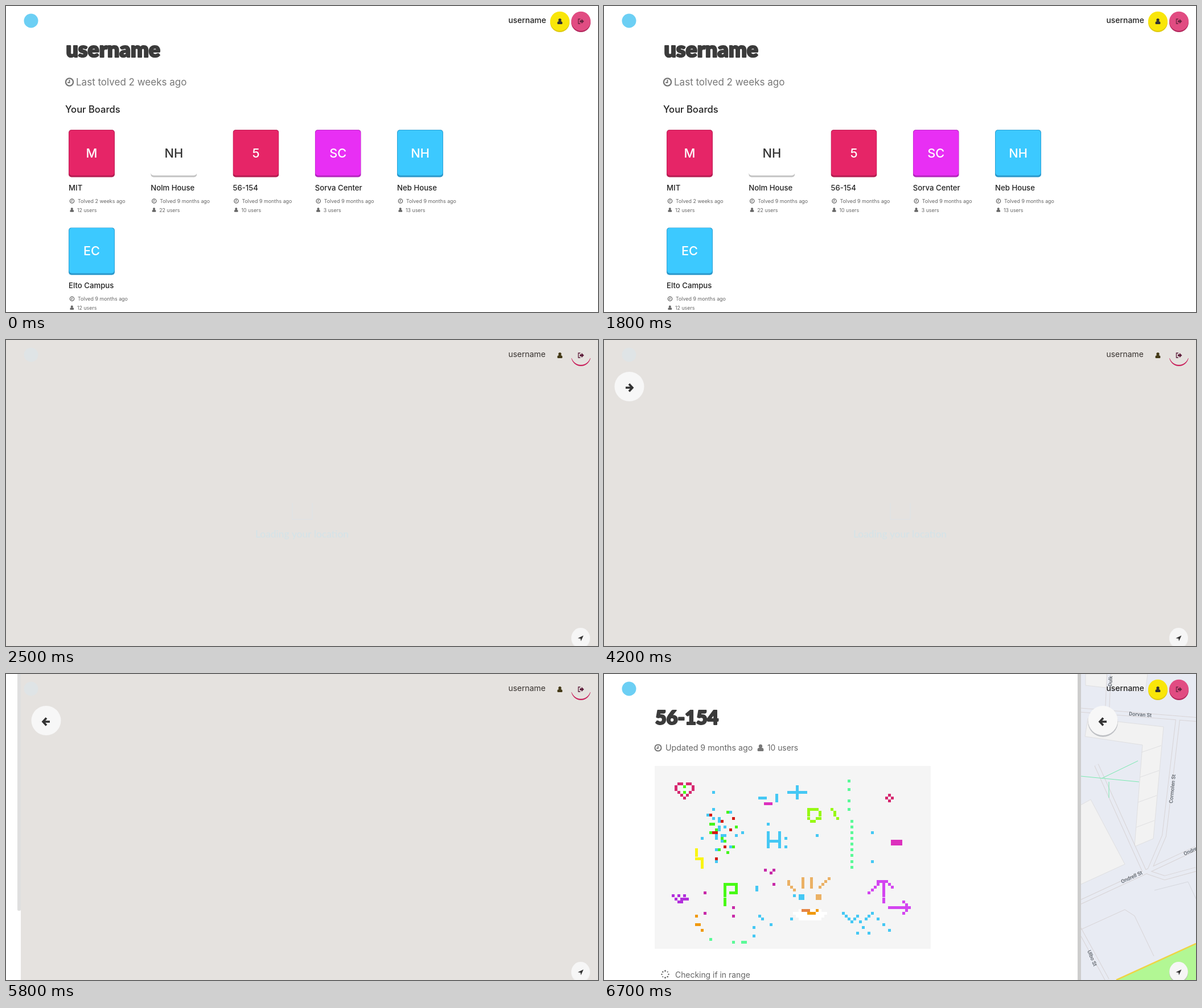
Recreate the animation shown at these times as an HTML page with a canvas. Size 1040 by 539 pixels, loop 6800 ms.

```html
<!DOCTYPE html>
<html lang="en">
<head>
<meta charset="utf-8">
<title>Pixel boards</title>
<style>
html, body { margin: 0; width: 100%; height: 100%; overflow: hidden; background: #fff; }
canvas { display: block; width: 1040px; height: 539px; }
</style>
</head>
<body>
<canvas id="stage" width="1040" height="539"></canvas>
<script>
const ctx = document.getElementById('stage').getContext('2d');
const LOOP = 6800, STEP = 100, TAU = Math.PI * 2;
const T = { loading: 1900, map: 2500, button: 3400, strip: 5100, slide: 5800, tiles: 6100, open: 6400 };
const SKY = '#3cc9ff', LOGO = '#6ccff4', INK = '#333', SOFT = '#666', GREY = '#e5e2df';
const BODY = 'Inter, sans-serif', DISPLAY = 'Lato, sans-serif';

const lerp = (a, b, p) => a + (b - a) * p;
const clamp = v => Math.min(1, Math.max(0, v));
const ease = u => u * u * (3 - 2 * u);
function seeded(seed) {
  return () => (seed = seed * 16807 % 2147483647) / 2147483647;
}

function rect(x, y, w, h, color) {
  ctx.fillStyle = color;
  ctx.fillRect(x, y, w, h);
}
function round(x, y, w, h, r, color) {
  ctx.fillStyle = color;
  ctx.beginPath();
  ctx.roundRect(x, y, w, h, r);
  ctx.fill();
}
function oval(x, y, rx, ry, color) {
  ctx.fillStyle = color;
  ctx.beginPath();
  ctx.ellipse(x, y, rx, ry, 0, 0, TAU);
  ctx.fill();
}
const disc = (x, y, r, color) => oval(x, y, r, r, color);
function poly(points, fill) {
  ctx.beginPath();
  points.forEach(([x, y]) => ctx.lineTo(x, y));
  ctx.closePath();
  ctx.fillStyle = fill;
  ctx.fill();
}
function line(points, color, width = 1) {
  ctx.beginPath();
  points.forEach(([x, y]) => ctx.lineTo(x, y));
  ctx.strokeStyle = color;
  ctx.lineWidth = width;
  ctx.stroke();
}
function clipped(x, y, w, h, draw) {
  ctx.save();
  ctx.beginPath();
  ctx.rect(x, y, w, h);
  ctx.clip();
  draw();
  ctx.restore();
}
function text(str, x, y, size, color = INK, weight = 400, align = 'left', family = BODY) {
  ctx.font = `${weight} ${size}px ${family}`;
  ctx.textAlign = align;
  ctx.fillStyle = color;
  ctx.fillText(str, x, y);
}
function heading(str, x, y, size, color, swell, align) {
  text(str, x, y, size, color, 900, align, DISPLAY);
  ctx.lineJoin = 'round';
  ctx.strokeStyle = color;
  ctx.lineWidth = swell;
  ctx.strokeText(str, x, y);
  ctx.lineJoin = 'miter';
}

// Icons
function clock(x, y, r, color) {
  ctx.strokeStyle = color;
  ctx.lineWidth = r * 0.3;
  ctx.beginPath();
  ctx.arc(x, y, r * 0.85, 0, TAU);
  ctx.stroke();
  line([[x, y - r * 0.5], [x, y + r * 0.12], [x - r * 0.42, y + r * 0.12]], color, r * 0.26);
}
function person(x, y, s, color) {
  disc(x, y - s * 0.45, s * 0.5, color);
  round(x - s * 0.85, y, s * 1.7, s * 0.95, [s * 0.5, s * 0.5, s * 0.25, s * 0.25], color);
}
function signOut(x, y, color) {
  line([[x - 1, y - 4], [x - 4.5, y - 4], [x - 4.5, y + 4], [x - 1, y + 4]], color, 1.3);
  rect(x - 2, y - 1.7, 3.2, 3.4, color);
  poly([[x + 1, y - 4.3], [x + 5.5, y], [x + 1, y + 4.3]], color);
}
function arrow(x, y, dir) {
  line([[x - 6.5 * dir, y], [x + 5 * dir, y]], INK, 3.6);
  line([[x - 0.5 * dir, y - 6.5], [x + 5.5 * dir, y], [x - 0.5 * dir, y + 6.5]], INK, 3.6);
}

// Header and floating buttons
function raisedDisc(x, color, shade) {
  disc(x, 29, 17, shade);
  disc(x, 26.7, 17, color);
}
function header() {
  text('username', 882.5, 29.5, 13.9, '#222', 500);
  raisedDisc(973, '#f9e609', '#dfca12');
  person(973, 27, 5.2, INK);
  raisedDisc(1010, '#e14c82', '#b3285d');
  signOut(1010, 27, '#6b2440');
}
function fadedHeader() {
  text('username', 882.5, 29.5, 13.9, '#37322f');
  person(973, 27, 5.2, '#443a18');
  clipped(990, 32, 40, 16, () => raisedDisc(1010, GREY, '#c9205b'));
  signOut(1010, 27, '#5e1f3c');
}
function logo(color) {
  disc(44, 26, 12.5, color);
}
function locate(shadow) {
  oval(1009.5, 526, 16.5, 18, shadow);
  oval(1009.5, 524.5, 16.3, 17.5, '#f6f6f6');
  poly([[1014.5, 520.5], [1010, 530.5], [1009.3, 526], [1004.5, 525.3]], INK);
}
function toggle(x, dir, raised) {
  if (raised) disc(x, 84.5, 26.3, '#bfc1c5');
  disc(x, 82, 26, '#f7f7f7');
  arrow(x, 84, dir);
}

// Board list
const TINTS = {
  rose: { face: '#e62567', shade: '#b51c51' },
  white: { face: '#fff', shade: '#c3c3c3' },
  violet: { face: '#e82ff4', shade: '#b426bd' },
  sky: { face: SKY, shade: '#2b98cb' }
};
const BOARDS = [
  { mark: 'M', name: 'MIT', tint: 'rose', users: 12, age: '2 weeks' },
  { mark: 'NH', name: 'Nolm House', tint: 'white', users: 22 },
  { mark: '5', name: '56-154', tint: 'rose', users: 10 },
  { mark: 'SC', name: 'Sorva Center', tint: 'violet', users: 3 },
  { mark: 'NH', name: 'Neb House', tint: 'sky', users: 13 },
  { mark: 'EC', name: 'Elto Campus', tint: 'sky', users: 12 }
];
function card({ mark, name, tint, users, age = '9 months' }, i) {
  const x = 110 + i % 5 * 144.25, y = 218 + Math.floor(i / 5) * 172.3;
  const { face, shade } = TINTS[tint], white = tint === 'white';
  clipped(x, white ? y + 76 : y, 81, 90, () => round(x, y, 81, 83.5, 5, shade));
  const inset = white ? 0 : 0.8;
  round(x + inset, y + inset, 81 - 2 * inset, 80.5 - inset, 5, face);
  text(mark, x + 40.5, y + 48.8, 21.8, white ? INK : '#fff', 500, 'center');
  text(name, x, y + 107, 13.2, '#222', 500);
  clock(x + 6, y + 125.5, 4.3, SOFT);
  text(`Tolved ${age} ago`, x + 16, y + 128.6, 8.9, SOFT);
  person(x + 5.8, y + 141, 4, SOFT);
  text(`${users} users`, x + 15, y + 144.5, 8.8, SOFT);
}
function home() {
  logo(LOGO);
  heading('username', 105.5, 90, 37.5, '#3b3b3b', 2.2);
  clock(111.5, 134, 7.8, '#777');
  text('Last tolved 2 weeks ago', 123, 140.3, 17, '#777');
  text('Your Boards', 104, 187.5, 16.6, '#222', 500);
  BOARDS.forEach(card);
}

// Square that flips about its two axes in turn
function flippingPlane(t) {
  const phase = (t - 1860) / 600, half = 14.6;
  const a = ease(phase % 1) * Math.PI, vertical = Math.floor(phase) % 2 === 0;
  poly([[-1, -1], [1, -1], [1, 1], [-1, 1]].map(([i, j]) => {
    const scale = half * 120 / (120 - half * (vertical ? j : i) * Math.sin(a));
    const x = vertical ? i : i * Math.cos(a), y = vertical ? j * Math.cos(a) : j;
    return [520 + x * scale, 299 + y * scale];
  }), SKY);
}
function loading(t) {
  rect(0, 0, 1, 539, '#ececec');
  logo(LOGO);
  flippingPlane(t);
  heading('Loading your location', 520, 347.5, 17.4, '#45c5f1', 0.8, 'center');
  locate('#aaa');
}
function loadingTrace() {
  line([[503, 287], [503, 316], [538, 316], [538, 287]], '#dce3e8');
  text('Loading your location', 520, 348, 17.4, '#d3e3e8', 400, 'center', DISPLAY);
}

// Street map
function street(str, x, y, angle) {
  ctx.save();
  ctx.translate(x, y);
  ctx.rotate(angle);
  text(str, 0, 0, 9.2, '#5d646c', 500, 'left', 'Roboto, sans-serif');
  ctx.restore();
}
function building(...points) {
  poly(points, '#f2f2f2');
  line([...points, points[0]], '#dfdfe1');
}
function streetMap() {
  const ground = '#e8ebf3', path = '#79eab0';
  rect(832, 0, 208, 539, ground);
  building([846, 0], [955, 0], [951, 32], [846, 20]);
  building([850, 78], [983, 93], [965, 290], [932, 304], [946, 125], [845, 110]);
  building([830, 235], [855, 221], [915, 335], [830, 374]);
  for (let i = 0; i < 4; i++) line([[944 - i * 3, 138 + i * 44], [979 - i * 4, 126 + i * 44]], '#dfdfe1');

  const roads = [
    [[887, 0], [884, 66]],
    [[830, 63], [1040, 80]],
    [[1008, 80], [984, 285], [958, 346]],
    [[865, 160], [950, 349]],
    [[830, 405], [955, 347], [1040, 307]],
    [[830, 440], [884, 539]],
    [[955, 349], [985, 359], [1040, 344]]
  ];
  roads.forEach(points => line(points, '#d8d4d6', 8));
  roads.forEach(points => line(points, ground, 6));
  line([[838, 450], [915, 415], [932, 426], [966, 497]], '#d8d4d6');
  line([[967, 381], [1026, 366], [1040, 396]], '#d5d7dd');

  line([[838, 180], [940, 190]], path);
  line([[874, 184], [938, 153]], path);
  line([[887, 190], [887, 218]], path);
  poly([[900, 539], [1040, 475], [1040, 539]], '#b2f794');
  line([[900, 539], [1040, 475]], '#efd445', 2.5);
  street('Dulk', 892, 22, -1.5);
  street('Dorvan St', 922, 73, 0.07);
  street('Cormolen St', 999, 228, -1.47);
  street('Ondrell St', 910, 369, -0.43);
  street('Ondrell St', 1020, 320, -0.43);
  street('Ulbo St', 849, 488, 1.18);
}

// Pixel board
function cell(color, c, r) {
  const x = Math.round(88.6 + c * 5.066), y = Math.round(160.3 + r * 5.07);
  rect(x, y, 5, 5, color);
}
function block(color, c, r, w, h) {
  rect(Math.round(88.6 + c * 5.066), Math.round(160.3 + r * 5.07), Math.round(w * 5.066), Math.round(h * 5.07), color);
}
// Pen line through key cells
function pen(color, ...keys) {
  keys.slice(1).forEach(([c, r], i) => {
    const [c0, r0] = keys[i], n = Math.max(Math.abs(c - c0), Math.abs(r - r0));
    for (let k = 0; k <= n; k++) cell(color, Math.round(lerp(c0, c, k / n)), Math.round(lerp(r0, r, k / n)));
  });
}
function scatter(color, n, c, r, w, h, seed) {
  const rand = seeded(seed);
  for (let i = 0; i < n; i++) cell(color, c + Math.floor(rand() * w), r + Math.floor(rand() * h));
}
function heart(c, r) {
  for (let d = 0; d <= 3; d++) {
    for (const side of [-d, d]) {
      cell('#d6286f', c + side, r + 5 - d);
      cell('#d6286f', c + side, r + (d % 3 ? 0 : 1));
    }
    if (d % 2) cell('#48fa16', c, r + d);
  }
}
function burst(c, r) {
  const rand = seeded(11), colors = ['#45c8f4', '#d31b14', '#45c8f4', '#45f51d'];
  const spread = n => (rand() + rand() + rand() - 1.5) * n;
  for (let i = 0; i < 50; i++) {
    const down = spread(9);
    cell(colors[i % 4], Math.round(c + down * 0.25 + spread(6)), Math.round(r + down));
  }
}
function face() {
  const tan = '#ebb165', orange = '#f0990e';
  for (const c of [51, 54]) pen(tan, [c, 39], [c, 42]);
  pen(tan, [46, 40], [46, 41], [48, 43]);
  pen(tan, [57, 42], [60, 39]);
  block(tan, 56, 45, 2, 2);
  block('#45c8f4', 50, 45, 2, 2);
  for (let r = 50; r <= 53; r++) pen('#fff', [48 + r % 3, r], [59 - r % 3, r]);
  pen('#e58545', [51, 50], [53, 50]);
  pen(orange, [53, 51], [55, 51], [56, 50]);
}
function board() {
  const blue = '#45c8f4', mint = '#5bfa98', lime = '#97f914', green = '#48fa16';
  const violet = '#d345f0', pink = '#dc30bd', plum = '#c82aa8', orange = '#f0990e';
  rect(89, 162, 485, 322, '#f5f5f5');
  heart(10, 6);
  burst(22.5, 22);
  face();

  pen(blue, [36, 11], [38, 11]);
  pen(blue, [42, 10], [42, 12]);
  pen(pink, [38, 13], [40, 13]);
  pen(blue, [46, 9], [52, 9]);
  pen(blue, [49, 7], [49, 11]);
  for (let r = 5; r < 16; r += 3.4) cell(mint, 67, Math.round(r));
  for (let r = 19; r < 36; r += 2) cell(mint, 68, r);
  for (let i = 0; i < 4; i++) cell('#d6286f', 81 + Math.round(Math.cos(i * TAU / 4)), 11 + Math.round(Math.sin(i * TAU / 4)));

  pen(lime, [54, 19], [53, 18], [53, 15], [56, 15], [57, 16], [57, 18], [54, 19]);
  pen(lime, [61, 15], [63, 18]);
  for (const c of [39, 43]) pen(blue, [c, 23], [c, 28]);
  pen(blue, [39, 26], [43, 26]);
  for (const r of [20, 25, 28]) cell(blue, r === 20 ? 39 : 45, r);
  block(pink, 82, 26, 4, 2);
  pen('#faf513', [14, 29], [14, 32], [16, 32], [16, 35]);
  for (let i = 0; i < 6; i++) cell('#b22fdc', 6 + i, 45 + i % 2);
  pen('#b22fdc', [7, 46], [8, 47], [10, 46]);
  pen(green, [24, 48], [24, 41], [28, 41], [28, 44], [26, 44]);

  pen(violet, [79, 47], [79, 40]);
  pen(violet, [74, 44], [77, 41], [77, 40], [80, 40], [82, 42]);
  pen(violet, [81, 49], [88, 49], [86, 47]);
  pen(violet, [88, 49], [86, 51]);
  pen(blue, [65, 51], [68, 54], [70, 52]);
  pen(blue, [73, 53], [75, 51]);

  scatter(blue, 7, 70, 53, 12, 8, 5);
  scatter(blue, 9, 34, 40, 15, 21, 21);
  scatter(blue, 3, 56, 22, 24, 12, 9);
  scatter(plum, 4, 38, 36, 7, 7, 31);
  scatter(plum, 4, 17, 41, 13, 15, 17);
  scatter(orange, 4, 14, 52, 5, 8, 3);
  scatter(mint, 4, 19, 57, 14, 5, 13);
}

function busyRing(t) {
  for (let i = 0; i < 8; i++) {
    const a = (i + t / STEP) * TAU / 8;
    disc(107.5 + 6 * Math.cos(a), 529 + 6 * Math.sin(a), 1.1 + (i % 4) * 0.1, SOFT);
  }
}
function sidebar(t, width, p) {
  clipped(0, 0, width, 539, () => {
    rect(0, 0, width, 539, '#fff');
    if (p === 0) return;
    logo(LOGO);
    heading('56-154', 90, 89, 34, '#3b3b3b', 2.2);
    clock(95, 130, 6.6, '#777');
    text('Updated 9 months ago', 108, 135, 14.2, SOFT);
    person(275, 130, 6.3, '#777');
    text('10 users', 287, 135, 13.8, SOFT);
    board();
    busyRing(t);
    text('Checking if in range', 125, 534.5, 13.9, SOFT);
  });
  const tone = Math.round(lerp(223, 205, p));
  round(width - 6 + 6 * p, -4, 6, lerp(421, 547, p), 2, `rgb(${tone},${tone},${tone})`);
}
function mapView(t) {
  const p = ease(clamp((t - T.slide) / (T.open - T.slide)));
  const width = t < T.strip ? 0 : lerp(26, 832, p), tiles = t >= T.tiles;
  if (tiles) streetMap();
  else {
    rect(0, 0, 1040, 539, GREY);
    logo('#dfe4e6');
  }
  if (t < T.strip) loadingTrace();
  else sidebar(t, width, p);
  if (tiles) header();
  else fadedHeader();
  if (t >= T.button) toggle(width + 44.5, t < T.strip ? 1 : -1, tiles);
  locate(tiles ? '#b5bfae' : '#efeeed');
}

function draw(t) {
  rect(0, 0, 1040, 539, '#fff');
  if (t >= T.map) return mapView(t);
  if (t >= T.loading) loading(t);
  else home();
  header();
}

const start = performance.now();
function tick() {
  const t = (performance.now() - start) % LOOP;
  draw(Math.floor(t / STEP) * STEP);
  requestAnimationFrame(tick);
}
tick();
</script>
</body>
</html>
```
